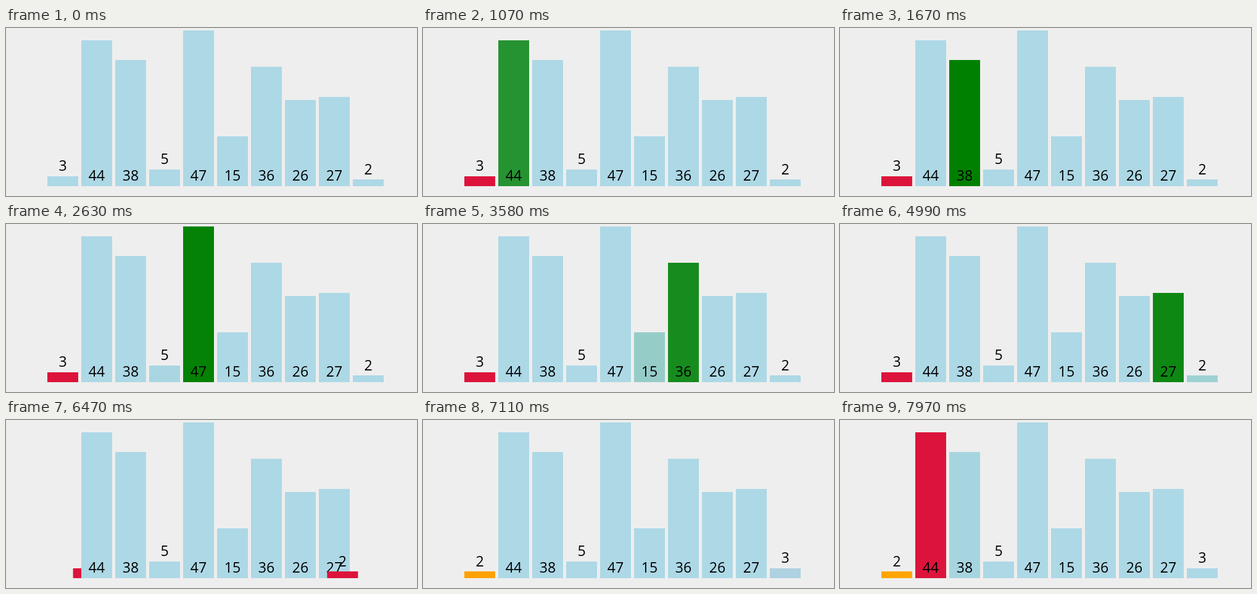
Recreate the animation shown at these times as an HTML page with a canvas. Size 666 px wide and 273 px high, loop 8000 ms.

```html
<!DOCTYPE html>
<html lang="en">
<head>
<meta charset="utf-8">
<title>Selection sort</title>
<style>
  html, body { margin: 0; overflow: hidden; background: #eee; }
  canvas { display: block; }
</style>
</head>
<body>
<canvas id="stage" width="666" height="273"></canvas>
<script>
const ctx = document.getElementById('stage').getContext('2d');
const LOOP = 8000, FADE = 250;
const LEFT = 67, PITCH = 55, WIDTH = 50, FLOOR = 257, UNIT = 5.385;
const BLUE = [173, 216, 230], GREEN = [0, 128, 0], RED = [220, 20, 60], ORANGE = [255, 165, 0];

const bars = [3, 44, 38, 5, 47, 15, 36, 26, 27, 2].map((value, slot) => ({
  value,
  height: Math.round(value * UNIT),
  color: [{ at: -FADE, to: BLUE }],
  slot: [{ at: -FADE, to: [slot] }]
}));

const paint = (at, index, to) => bars[index].color.push({ at, to });
const move = (at, index, slot) => bars[index].slot.push({ at, to: [slot] });

// First pass: scan for the minimum
paint(380, 0, RED);
[915, 1395, 1915, 2426, 2915, 3411, 3915, 4390, 4922].forEach((at, i) => {
  if (i) paint(at, i, BLUE);
  paint(at, i + 1, GREEN);
});

// Swap the minimum into place
paint(5415, 0, BLUE);
paint(5415, 9, RED);
paint(5915, 0, RED);
move(6402, 0, 9);
move(6402, 9, 0);
paint(6910, 0, BLUE);
paint(6910, 9, ORANGE);

// Second pass begins
paint(7415, 1, RED);
paint(7921, 2, GREEN);

const ease = p => p < .5 ? 4 * p ** 3 : 1 - 4 * (1 - p) ** 3;

function valueAt(track, time) {
  let i = track.length - 1;
  while (i && track[i].at > time) i--;
  const { at, to } = track[i];
  const from = track[Math.max(0, i - 1)].to;
  const p = ease(Math.min(1, (time - at) / FADE));
  return to.map((v, n) => from[n] + (v - from[n]) * p);
}

function draw(now) {
  const time = now % LOOP;
  ctx.fillStyle = '#eee';
  ctx.fillRect(0, 0, 666, 273);
  ctx.font = '23px "Open Sans", "Noto Sans", sans-serif';
  ctx.textAlign = 'center';
  for (const { value, height, color, slot } of bars) {
    const x = LEFT + PITCH * valueAt(slot, time)[0];
    ctx.fillStyle = `rgb(${valueAt(color, time).map(Math.round)})`;
    ctx.fillRect(x, FLOOR - height, WIDTH, height);
    // Short bars carry their label on top
    const base = value < 10 ? FLOOR - value * UNIT - 8.7 : FLOOR - 9;
    ctx.fillStyle = '#000';
    ctx.fillText(value, x + WIDTH / 2, Math.round(base));
  }
  requestAnimationFrame(draw);
}
requestAnimationFrame(draw);
</script>
</body>
</html>
```
